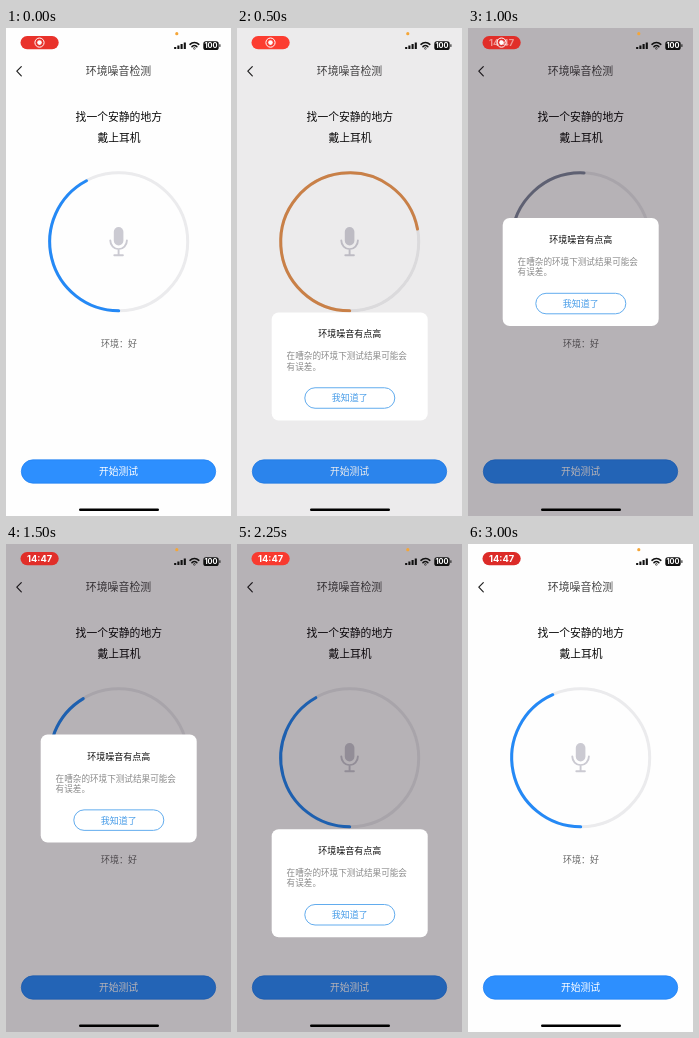
An HTML page for the animation above (3120 ms loop, 225 by 488 pixels).

```html
<!DOCTYPE html>
<html lang="zh-CN">
<head>
<meta charset="utf-8">
<style>
  html, body { margin: 0; width: 100%; height: 100%; overflow: hidden; background: #fff; }
  svg { display: block; width: 225px; height: 488px; }
  text { font-family: "Noto Sans CJK SC", "Noto Sans CJK", sans-serif; text-anchor: middle; }
  .latin { font-family: Inter, sans-serif; font-weight: 700; fill: #fff; }
  .line { fill: none; stroke-linecap: round; stroke-linejoin: round; }
  .lead { font-size: 10.8px; font-weight: 500; fill: #0a0a0a; }
  .body { font-size: 8.6px; fill: #8a8a8a; text-anchor: start; }
</style>
</head>
<body>
<svg viewBox="0 0 225 488">
  <rect width="225" height="488" fill="#fefefe"/>

  <!-- page -->
  <path class="line" d="M15.3 38.6L10.8 43.2L15.3 47.8" stroke="#222" stroke-width="1.2"/>
  <text x="112.5" y="47.1" font-size="10.9" fill="#444">环境噪音检测</text>
  <text class="lead" x="112.8" y="93.1">找一个安静的地方</text>
  <text class="lead" x="113" y="114.1">戴上耳机</text>
  <circle cx="112.7" cy="213.8" r="69" fill="none" stroke="#ebebed" stroke-width="3"/>
  <path id="level" class="line" stroke-width="3"/>
  <rect x="107.8" y="199" width="9.6" height="18.5" rx="4.8" fill="#cbcad2"/>
  <path class="line" d="M104.3 212.5a8.3 8.6 0 0 0 16.6 0M112.6 221.5v5.7M108.3 227.3h8.6" stroke="#cbcad2" stroke-width="1.9"/>
  <text x="113" y="318.6" font-size="9" fill="#666">环境：好</text>
  <rect x="15.3" y="431.8" width="194.4" height="23.4" rx="11.7" fill="#2d8ffe" stroke="#1c7ff2" stroke-width=".7"/>
  <text x="112.5" y="447.2" font-size="9.8" font-weight="500" fill="#fff">开始测试</text>

  <rect id="dim" width="225" height="488" fill="#10000f"/>

  <g id="dialog">
    <rect x="34.7" width="156" height="108" rx="7" fill="#fff"/>
    <text x="112.7" y="25" font-size="9" font-weight="500" fill="#111">环境噪音有点高</text>
    <text class="body" x="49.6" y="47">在嘈杂的环境下测试结果可能会</text>
    <text class="body" x="49.6" y="57.2">有误差。</text>
    <rect x="67.8" y="75.3" width="90" height="20.5" rx="10.25" fill="none" stroke="#62acee"/>
    <text x="112.8" y="89" font-size="9" fill="#459be8">我知道了</text>
  </g>

  <!-- system bar -->
  <circle cx="170.8" cy="5.7" r="1.6" fill="#f5a638"/>
  <path d="M169.2 21v-2M172.4 21v-3.4M175.6 21v-5M178.8 21v-6.6" stroke="#111" stroke-width="2.1"/>
  <g class="line" stroke="#111" stroke-width="1.6">
    <path d="M184 16.3a6.4 6.4 0 0 1 8.8 0M186 18.6a3.6 3.6 0 0 1 4.8 0"/>
    <circle cx="188.4" cy="20.4" r=".3"/>
  </g>
  <rect x="197.3" y="13.3" width="15.4" height="8.8" rx="2.6" fill="#111"/>
  <path d="M213.9 16.3v2.6" stroke="#111"/>
  <text class="latin" x="205" y="20.4" font-size="7.4">100</text>
  <rect x="73" y="480.5" width="80" height="2.6" rx="1.3" fill="#000"/>
  <rect id="pill" x="14.5" y="8" width="38.2" height="13.2" rx="6.6"/>
  <g id="record">
    <circle cx="33.5" cy="14.6" r="4.6" fill="none" stroke="#fff"/>
    <circle cx="33.5" cy="14.6" r="2.3" fill="#fff"/>
  </g>
  <text id="clock" class="latin" x="33.6" y="18" font-size="9.3">14:47</text>
</svg>
<script>
const LOOP = 3120, STEP = 125;
const CX = 112.7, CY = 213.8, R = 69;
const BOTTOM = 488, REST = 190;
const BLUE = [36, 137, 246], ORANGE = [216, 138, 76];
const DIM_RED = [218, 42, 39], RED = [252, 60, 48];

const clamp = v => Math.min(1, Math.max(0, v));
const bump = (x, centre, width) => Math.exp(-(((x - centre) / width) ** 2));
const mix = (a, b, k) => `rgb(${a.map((v, i) => Math.round(v + (b[i] - v) * k))})`;

function set(id, attributes) {
  const node = document.getElementById(id);
  for (const name in attributes) node.setAttribute(name, attributes[name]);
}

// Arc grows clockwise from the bottom of the ring.
function arc(degrees) {
  const a = degrees * Math.PI / 180;
  const x = CX - R * Math.sin(a), y = CY + R * Math.cos(a);
  return `M${CX} ${CY + R}A${R} ${R} 0 ${degrees > 180 ? 1 : 0} 1 ${x} ${y}`;
}

function draw(time) {
  const step = Math.floor(time % LOOP / STEP);
  const ramp = (from, to) => clamp((step - from) / (to - from));

  // A loud burst early on, a small one near the end.
  const angle = 149 + 128 * bump(step, 5, 2.6) + 34 * bump(step, 21.5, 2);
  set('level', { d: arc(angle), stroke: mix(BLUE, ORANGE, clamp((angle - 158) / 48)) });

  // The dialog eases out on entry, accelerates on exit, then is dismissed.
  const shown = 1 - (1 - ramp(2.6, 7)) ** 3 - ramp(11.5, 23) ** 2;
  set('dialog', {
    transform: `translate(0 ${BOTTOM - (BOTTOM - REST) * shown})`,
    opacity: step < 21 ? 1 : 0
  });
  set('dim', { opacity: 0.3 * (ramp(3, 7) - ramp(21, 24)) });

  const pulse = 0.5 + 0.5 * Math.cos((step - 16.5) / 13 * 2 * Math.PI);
  set('pill', { fill: mix(DIM_RED, RED, pulse) });
  set('clock', { opacity: ramp(7, 9) });
  set('record', { opacity: 1 - ramp(8, 9) });
}

const start = performance.now();
function tick() {
  draw(performance.now() - start);
  requestAnimationFrame(tick);
}
tick();
</script>
</body>
</html>
```
